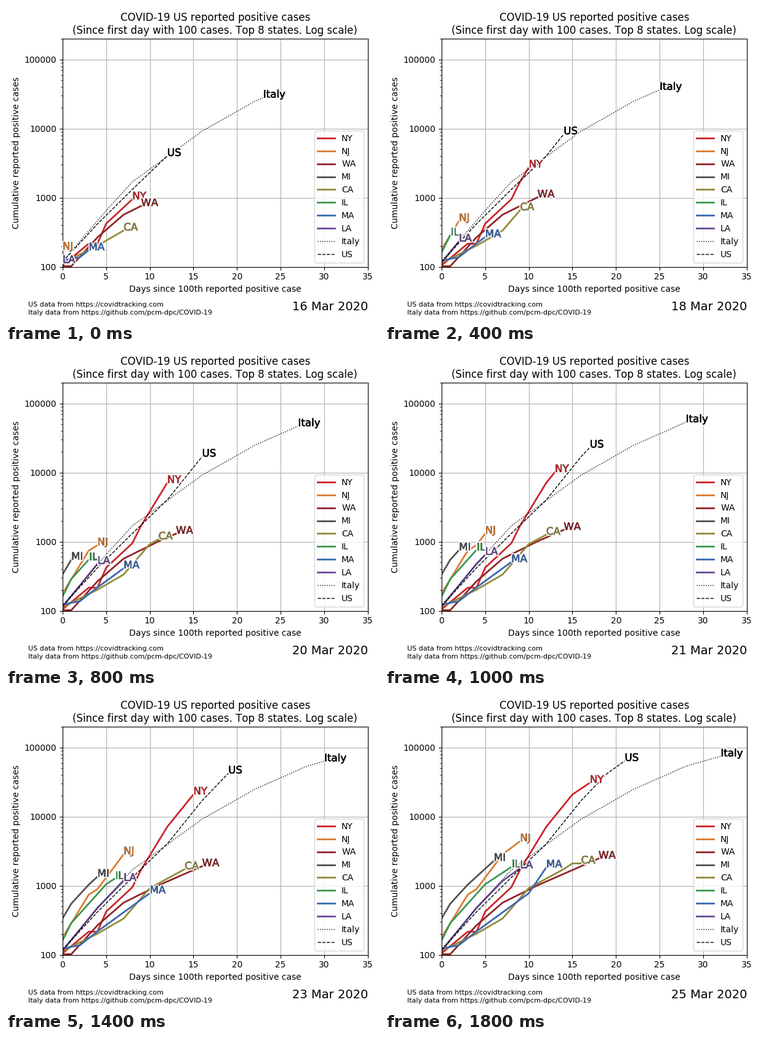
Animation, 606 px wide and 512 px high, one loop 4.4 s. Source, as a matplotlib script:

```python
import numpy as np
import matplotlib.pyplot as plt
import matplotlib.patheffects as pe
from matplotlib.animation import FuncAnimation
from matplotlib.ticker import FormatStrFormatter

WIDTH, HEIGHT, DPI = 606, 512, 100
FIRST_DATE, DAYS, TICKS = 16, 10, 22

# Turning points of each curve {day: cases}; growth is exponential in between.
# The last point falls on the last date shown.
STATES = {
    "NY": ("#cc2529", {0: 105, 3: 216, 4: 216, 5: 421, 8: 950, 9: 1700, 12: 7102,
                       15: 20875, 17: 30811}),
    "NJ": ("#da7c30", {0: 178, 3: 742, 4: 890, 7: 2844, 9: 4402}),
    "WA": ("#922428", {0: 102, 1: 102, 4: 267, 7: 568, 11: 1012, 18: 2469}),
    "MI": ("#535154", {0: 336, 1: 549, 3: 1035, 6: 2294}),
    "CA": ("#948b3d", {0: 114, 4: 202, 7: 335, 10: 924, 14: 1733, 15: 2102, 16: 2102}),
    "IL": ("#3e9651", {0: 160, 1: 288, 5: 1049, 8: 1865}),
    "MA": ("#396ab1", {0: 123, 2: 138, 4: 218, 10: 777, 12: 1838}),
    "LA": ("#6b4c9a", {0: 114, 4: 479, 7: 1172, 9: 1795}),
}
COUNTRIES = {
    "Italy": (":", {0: 120, 5: 650, 8: 1694, 16: 9172, 22: 24747, 28: 53578, 32: 74386}),
    "US": ("--", {0: 118, 4: 417, 8: 1315, 12: 4019, 16: 17038, 19: 42152, 21: 63928}),
}

plt.rcParams["font.family"] = "DejaVu Sans"
plt.rcParams["text.kerning_factor"] = 6
fig = plt.figure(figsize=(WIDTH / DPI, HEIGHT / DPI), dpi=DPI)
ax = fig.add_axes([91.86 / WIDTH, 89.42 / HEIGHT, 496 / WIDTH, 369.6 / HEIGHT])
ax.set_yscale("log")
ax.set(xlim=(0, 35), ylim=(100, 200000),
       xlabel="Days since 100th reported positive case",
       ylabel="Cumulative reported positive cases",
       title="COVID-19 US reported positive cases\n"
             "(Since first day with 100 cases. Top 8 states. Log scale)")
ax.yaxis.set_major_formatter(FormatStrFormatter("%d"))
ax.grid(True)


class Curve:
    """A growing line with its name at the tip."""

    effects = [pe.Stroke(linewidth=3, foreground="white"),
               pe.Stroke(linewidth=0.4, foreground="black"), pe.Normal()]

    def __init__(self, name, points, color="black", style="-", width=1):
        turns = list(points)
        self.days = np.arange(turns[-1] + 1)
        self.cases = np.exp(np.interp(self.days, turns, np.log(list(points.values()))))
        self.line, = ax.plot([], [], style, color=color, lw=width, label=name)
        self.label = ax.text(0, 100, name, color=color, fontsize=12,
                             path_effects=self.effects)

    def show(self, days_left):
        count = max(len(self.days) - days_left, 0)
        self.line.set_data(self.days[:count], self.cases[:count])
        self.label.set_visible(count > 0)
        if count:
            self.label.set_position((self.days[count - 1], self.cases[count - 1]))


curves = [Curve(name, points, color=color, width=2)
          for name, (color, points) in STATES.items()]
curves += [Curve(name, points, style=style)
           for name, (style, points) in COUNTRIES.items()]
ax.legend(loc="lower right")


def note(x, y, text, size, align="left"):
    return fig.text(x / WIDTH, y / HEIGHT, text, fontsize=size, ha=align)


note(36, 25, "US data from https://covidtracking.com", 8)
note(36, 12, "Italy data from https://github.com/pcm-dpc/COVID-19", 8)
date = note(588, 19, "", 14, "right")


def update(tick):
    day = min(tick, DAYS - 1)
    for curve in curves:
        curve.show(DAYS - 1 - day)
    date.set_text(f"{FIRST_DATE + day} Mar 2020")


anim = FuncAnimation(fig, update, frames=TICKS, interval=200, repeat=True, repeat_delay=0)
plt.show()
```
